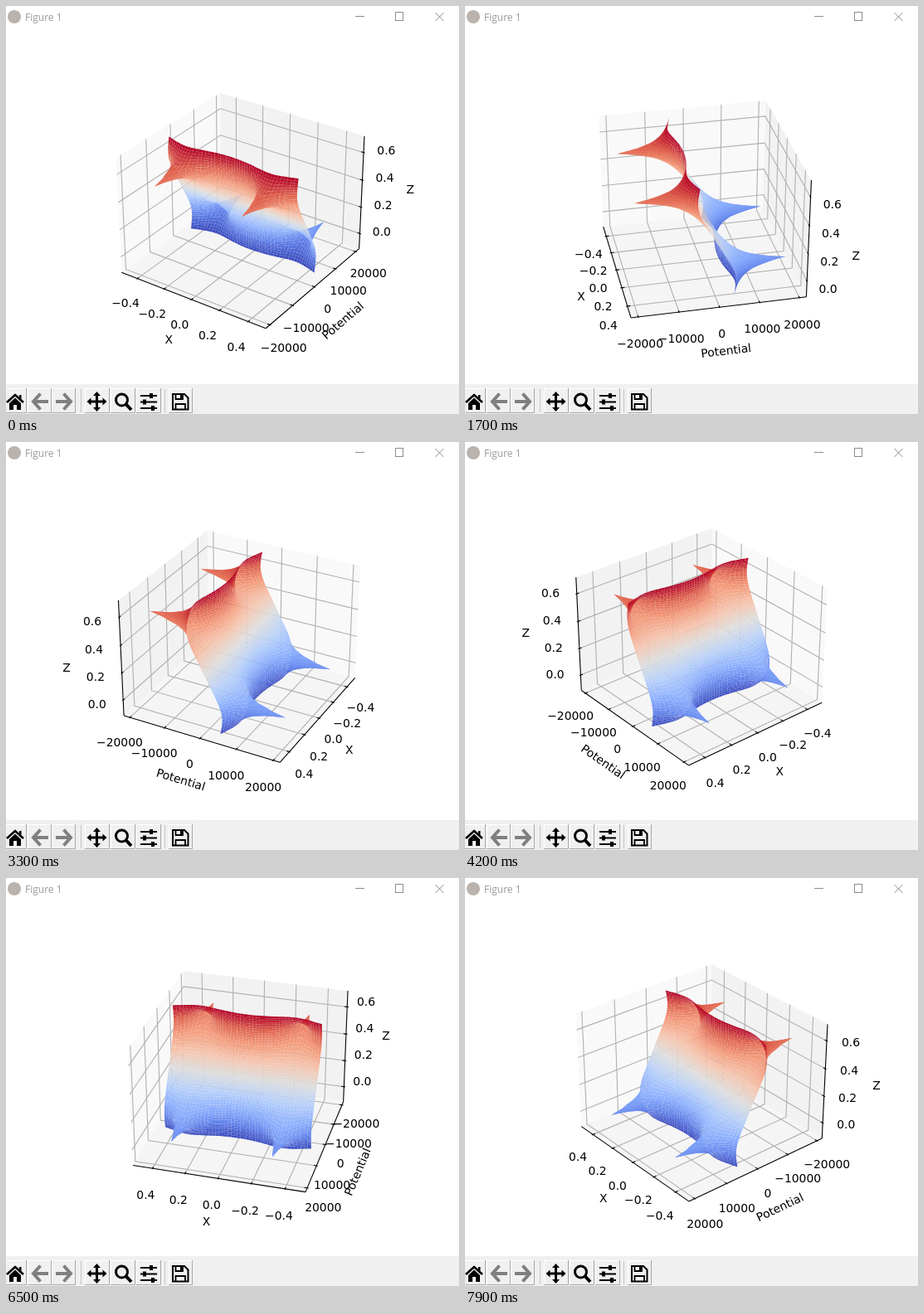
An HTML page with a canvas that plays this animation: 546 px wide and 492 px high, repeating every 8 s.

```html
<!DOCTYPE html>
<html lang="en">
<head>
<meta charset="utf-8">
<title>Figure 1</title>
<style>
  html, body { margin: 0; width: 100%; height: 100%; overflow: hidden; background: #fff; }
  svg, canvas { position: absolute; left: 0; top: 0; display: block; }
</style>
</head>
<body>
<svg width="546" height="492" viewBox="0 0 546 492">
  <circle cx="10" cy="13" r="8" fill="#b9b2ad"/>
  <text x="23" y="17.5" font-size="12" fill="#999" font-family="'Open Sans', 'Noto Sans', sans-serif">Figure 1</text>
  <g fill="none" stroke="#8c8c8c">
    <path d="M421 12.5h11M517.500 8l10 10M527.500 8l-10 10"/>
    <rect x="469.500" y="7.500" width="9" height="10"/>
  </g>
  <rect y="456" width="546" height="36" fill="#f0f0f0"/>
  <g id="buttons" fill="none"></g>
  <g fill="none" stroke="#000">
    <path d="M1 478L11 469L21 478" stroke-width="2.600"/>
    <path d="M4 479L11 472.500L18 479V487H13V481H9V487H4ZM16 469h2.500v5l-2.500-2z" fill="#000" stroke="none"/>
    <g stroke="#7f7f7f" stroke-width="4">
      <path d="M41.500 467.500L33 477L41.500 486.500M33 477H51"/>
      <path d="M69.500 467.500L78 477L69.500 486.500M78 477H60"/>
    </g>
    <path d="M109.500 469V485M101.500 477H117.500" stroke-width="3"/>
    <path d="M109.500 465l4.500 5h-9zM109.500 489l4.500-5h-9zM97.500 477l5-4.500v9zM121.500 477l-5-4.500v9z" fill="#000" stroke="none"/>
    <circle cx="139.500" cy="475" r="7" stroke-width="3"/>
    <path d="M144.500 480L151 487" stroke-width="4"/>
    <path d="M162 470H182M162 477.500H182M162 485H182" stroke-width="2"/>
    <path d="M175 467v6M167 474.500v6M177 482v6" stroke-width="4"/>
    <path d="M201 468H215L219.500 472.500V486.500H201Z" stroke-width="2"/>
    <path d="M204.500 468V474H213V468M204.500 486V480H216V486" stroke-width="1.800"/>
    <path d="M211 469v4" stroke-width="2"/>
  </g>
</svg>
<canvas id="plot" width="546" height="456"></canvas>
<script>
const LOOP = 8000, TICK = 100;
const ELEV = Math.PI / 6, DIST = 10, SCALE = 177, CX = 284.3, CY = 239.8;
const ctx = document.getElementById('plot').getContext('2d');

// Toolbar buttons with a raised edge, and two separators
const bevel = (x, w) =>
  `<path d="M${x + .5} 490.500V461.500H${x + w}" stroke="#fff"/>
   <path d="M${x + w + .5} 461V490.500H${x}" stroke="#a8a8a8"/>`;
document.getElementById('buttons').innerHTML =
  [[-2, 26], [26, 28], [55, 28], [95, 29], [126, 29], [157, 29], [196, 28]]
    .map(([x, w]) => bevel(x, w)).join('') +
  [90, 191].map(x => `<path d="M${x}.500 462V490" stroke="#c4c4c4"/>`).join('');

// Camera azimuth in degrees; some ticks repeat the picture before them
const TURN = [[0, -55.6], [1000, -29.5], [5400, 80.4], [6500, 105.4], [7900, 140.3]];
const HOLDS = [[500, 900, 400], [2500, 2500, 2400], [3100, 3100, 3000],
               [3900, 3900, 3800], [4100, 4100, 4000]];

function azimuth(time) {
  let t = Math.floor(time / TICK) * TICK;
  for (const [from, to, shown] of HOLDS) if (t >= from && t <= to) t = shown;
  const next = Math.max(1, TURN.findIndex(([at]) => at >= t));
  const [[t0, a0], [t1, a1]] = [TURN[next - 1], TURN[next]];
  return (a0 + (a1 - a0) * (t - t0) / (t1 - t0)) * Math.PI / 180;
}

let cosA, sinA;
function project([x, y, z]) {
  const right = -sinA * x + cosA * y;
  const toward = cosA * x + sinA * y;
  const up = z * Math.cos(ELEV) - toward * Math.sin(ELEV);
  const depth = DIST - toward * Math.cos(ELEV) - z * Math.sin(ELEV);
  const k = SCALE * DIST / depth;
  return [CX + right * k, CY - up * k, depth];
}

// Half sizes of the view limits and of the slightly larger panes
const LIMIT = [0.571, 0.571, 0.4286];
const PANE = LIMIT.map(h => h * 25 / 24);
const AXES = [
  { name: 'X', ticks: [-0.4, -0.2, 0, 0.2, 0.4], mid: 0, half: 0.5, digits: 1 },
  { name: 'Potential', ticks: [-20000, -10000, 0, 10000, 20000], mid: 0, half: 20900, digits: 0 },
  { name: 'Z', ticks: [0, 0.2, 0.4, 0.6], mid: 0.3, half: 0.4, digits: 1 }
];

// Sheet: potential of two positive and two negative charges that sit on grid nodes
const COLS = 48, ROWS = 50, HALF_X = 0.456, HALF_Z = 0.392;
const CHARGE_X = HALF_X * 16 / 24, CHARGE_Z = HALF_Z * 16 / 25;
const STRENGTH = 0.229, FALLOFF = 0.28, CORE = 0.0132;
const STOPS = [[59, 76, 192], [98, 130, 234], [141, 176, 254], [184, 208, 249], [221, 221, 221],
               [245, 196, 173], [244, 154, 123], [222, 96, 77], [180, 4, 38]];

function potential(x, z) {
  let sum = 0;
  for (const sx of [-1, 1]) for (const sz of [-1, 1]) {
    const r = Math.hypot(x - sx * CHARGE_X, z - sz * CHARGE_Z, CORE);
    sum -= sz * r ** -FALLOFF;
  }
  return STRENGTH * sum;
}

const sheet = [];
for (let i = 0; i <= COLS; i++) for (let j = 0; j <= ROWS; j++) {
  const u = 2 * i / COLS - 1, v = 2 * j / ROWS - 1;
  sheet.push([u * 0.521, potential(u * HALF_X, v * HALF_Z), v * 0.42]);
}

const rowColor = Array.from({ length: ROWS }, (_, j) => {
  const f = j / (ROWS - 1) * (STOPS.length - 1);
  const i = Math.min(Math.floor(f), STOPS.length - 2);
  return `rgb(${STOPS[i].map((c, n) => Math.round(c + (STOPS[i + 1][n] - c) * (f - i)))})`;
});

function trace(points) {
  ctx.beginPath();
  for (const [x, y] of points) ctx.lineTo(x, y);
}
function line(points, color, width = 1.1) {
  trace(points.map(project));
  ctx.strokeStyle = color;
  ctx.lineWidth = width;
  ctx.stroke();
}
function label(text, [x, y], angle = 0) {
  ctx.save();
  ctx.translate(x - 1.8, y);
  ctx.rotate(angle);
  ctx.fillText(text, 0, 5);
  ctx.restore();
}
const withAt = (p, axis, value) => p.map((c, i) => i === axis ? value : c);

function drawPanes(back) {
  const shades = ['#f9f9f9', '#f2f2f2', '#f5f5f5'];
  shades.forEach((shade, n) => {
    const [a, b] = [0, 1, 2].filter(i => i !== n);
    const corners = [[-1, -1], [1, -1], [1, 1], [-1, 1]].map(([s, t]) =>
      withAt(withAt(back, a, s * PANE[a]), b, t * PANE[b]));
    trace(corners.map(project));
    ctx.fillStyle = shade;
    ctx.fill();
  });
}

function drawAxis(n, back) {
  const { name, ticks, mid, half, digits } = AXES[n];
  const front = back.map(c => -c);
  const tickDir = n === 0 ? 1 : 0;
  const edge = withAt(back, tickDir, front[tickDir]);
  const other = n === 2 ? 1 : 2;
  const outward = (p, share) =>
    p.map((c, i) => i === n ? c : c + Math.sign(c) * share * 2 * LIMIT[i]);
  const spots = ticks.map(t => withAt(edge, n, (t - mid) / half * LIMIT[n]));

  for (const p of spots) {
    const corner = withAt(p, tickDir, back[tickDir]);
    line([p, corner, withAt(corner, other, front[other])], '#b0b0b0');
  }
  const ends = [-1, 1].map(s => withAt(edge, n, s * PANE[n]));
  line(ends, '#000');

  ctx.fillStyle = '#000';
  spots.forEach((p, i) => {
    const side = Math.sign(edge[tickDir]);
    line([0.0095, -0.019].map(d => withAt(p, tickDir, p[tickDir] + side * d)), '#000');
    const [x, y] = project(outward(p, 0.105));
    const text = ticks[i].toFixed(digits).replace('-', '\u2212');
    label(text, [x, y + (n === 2 ? 0 : 6.5)]);
  });

  let angle = 0;
  if (name.length > 4) {
    const [[x0, y0], [x1, y1]] = ends.map(project);
    angle = Math.atan((y1 - y0) / (x1 - x0));
  }
  label(name, project(outward(withAt(edge, n, 0), n === 2 ? 0.222 : 0.212)), angle);
}

function drawSheet() {
  const pts = sheet.map(project), quads = [];
  for (let i = 0; i < COLS; i++) for (let j = 0; j < ROWS; j++) {
    const k = i * (ROWS + 1) + j;
    const q = [pts[k], pts[k + 1], pts[k + ROWS + 2], pts[k + ROWS + 1]];
    quads.push({ q, color: rowColor[j], depth: q[0][2] + q[1][2] + q[2][2] + q[3][2] });
  }
  quads.sort((a, b) => b.depth - a.depth);
  for (const { q, color } of quads) {
    trace(q);
    ctx.fillStyle = color;
    ctx.fill();
  }
}

function draw(angle) {
  cosA = Math.cos(angle);
  sinA = Math.sin(angle);
  ctx.clearRect(0, 0, 546, 456);
  ctx.font = '13.9px "DejaVu Sans", sans-serif';
  ctx.textAlign = 'center';
  const back = [cosA > 0 ? -PANE[0] : PANE[0], sinA > 0 ? -PANE[1] : PANE[1], -PANE[2]];
  drawPanes(back);
  for (let n = 0; n < 3; n++) drawAxis(n, back);
  drawSheet();
}

let start, shown;
function frame(now) {
  start ??= now;
  const angle = azimuth((now - start) % LOOP);
  if (angle !== shown) draw(shown = angle);
  requestAnimationFrame(frame);
}
draw(shown = azimuth(0));
requestAnimationFrame(frame);
</script>
</body>
</html>
```
